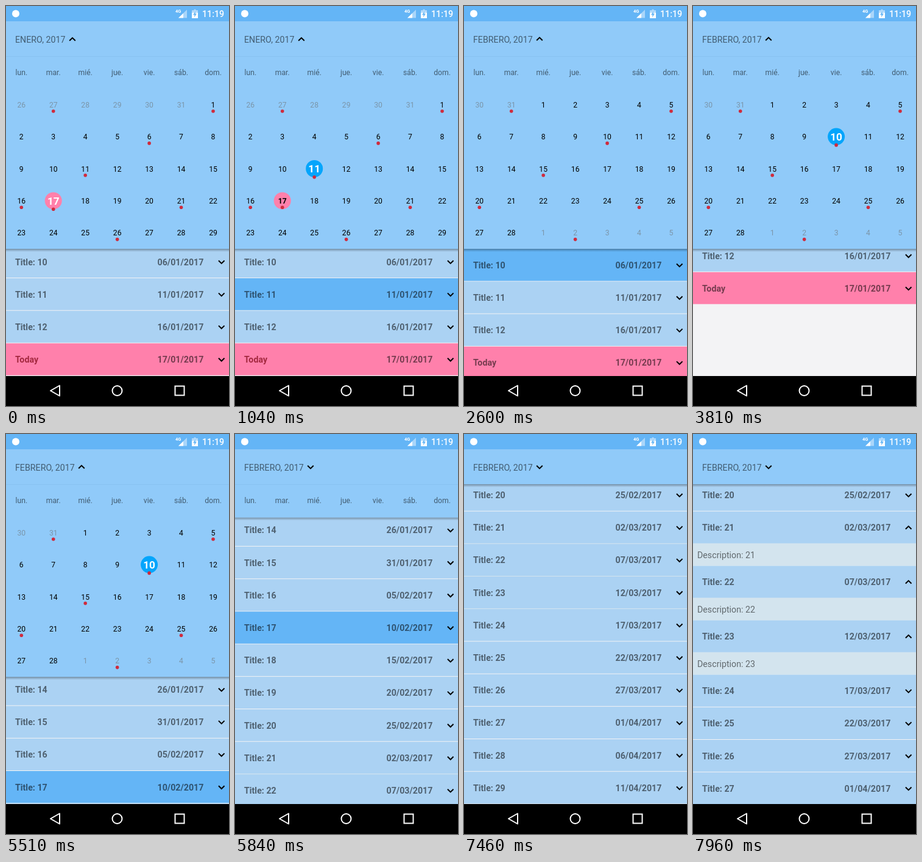
Animation of 366 by 654 pixels, one loop 8 s. Source, as an HTML page:

```html
<!DOCTYPE html>
<html lang="es">
<head>
<meta charset="utf-8">
<title>Calendario</title>
<style>
  html, body { margin: 0; width: 100%; height: 100%; overflow: hidden; background: #000; }
  svg { display: block; width: 100%; height: 100%; font-family: Roboto, sans-serif; }
</style>
</head>
<body>
<svg id="stage" viewBox="0 0 366 654">
  <defs>
    <linearGradient id="shade" x1="0" y1="0" x2="0" y2="1">
      <stop offset="0" stop-color="#000" stop-opacity=".32"/>
      <stop offset="1" stop-color="#000" stop-opacity="0"/>
    </linearGradient>
    <clipPath id="gridClip"><rect id="gridArea" x="0" y="82" width="366" height="315"/></clipPath>
  </defs>
  <rect width="366" height="654" fill="#f3f3f5"/>
  <g id="list"></g>
  <rect id="shadow" width="366" height="5" fill="url(#shade)"/>
  <rect id="panel" y="25" width="366" fill="#90caf9"/>
  <g clip-path="url(#gridClip)">
    <rect y="80.5" width="366" height="2" fill="#7fb8e6"/>
    <g id="days"></g>
    <g id="january"></g>
    <g id="february"></g>
  </g>
  <g id="header"></g>
  <g id="status">
    <rect width="366" height="25" fill="#64b5f6"/>
    <circle cx="16" cy="12.5" r="6" fill="#fff"/>
    <path d="M297 6V19.500H283Z" fill="#fff" opacity=".45"/>
    <path d="M291 12V19.500H283Z" fill="#fff"/>
    <path d="M308.500 5.500h3v1.500h3.500v13h-10v-13h3.500z" fill="#fff" opacity=".5"/>
    <path d="M305 11h10v9h-10z" fill="#fff"/>
    <path d="M311 8.500L307 14.500h2.500L309 18.500L313 12.500h-2.500z" fill="#64b5f6"/>
  </g>
  <g fill="none" stroke="#fff" stroke-width="2">
    <rect x="-5" y="605" width="376" height="60" fill="#000" stroke="none"/>
    <path d="M88 620.500V637.500L73 629Z" stroke-linejoin="round"/>
    <circle cx="182.500" cy="629" r="8"/>
    <rect x="277.500" y="621.500" width="15" height="15"/>
  </g>
</svg>
<script>
const LOOP = 8000, PITCH = 53.2, DESC = 35.8, BODY = 14.23, SMALL = 12.2;
const SOFT = 'rgba(0,0,0,.54)', BLUE = '#64b5f6', PINK = '#ff80ab';
const $ = id => document.getElementById(id);

function add(parent, tag, attrs, text) {
  const el = document.createElementNS('http://www.w3.org/2000/svg', tag);
  set(el, attrs);
  if (text !== undefined) el.textContent = text;
  return parent.appendChild(el);
}
function set(el, attrs) {
  for (const name in attrs) el.setAttribute(name, attrs[name]);
}
const label = (parent, text, x, y, size, attrs = {}) =>
  add(parent, 'text', { x, y: y + size * 0.355, 'font-size': size, fill: SOFT, ...attrs }, text);
const chevron = parent =>
  add(parent, 'path', { d: 'M-4.8 -2.3L0 2.4L4.8 -2.3', fill: 'none', stroke: '#000', 'stroke-width': 2 });
const place = (el, x, y, flip = 1) => el.setAttribute('transform', `translate(${x} ${y}) scale(1 ${flip})`);

const ease = {
  linear: u => u,
  out: u => 1 - (1 - u) ** 2,
  inOut: u => u * u * (3 - 2 * u)
};
// Each step: [time, value, easing towards it]
function track(t, steps) {
  let [t0, v0] = steps[0];
  for (const [t1, v1, kind = 'linear'] of steps) {
    if (t < t1) return t <= t0 ? v0 : v0 + (v1 - v0) * ease[kind]((t - t0) / (t1 - t0));
    [t0, v0] = [t1, v1];
  }
  return v0;
}
const ramp = (t, from, to, kind = 'inOut') => track(t, [[from, 0], [to, 1, kind]]);

const scrollSteps = [
  [0, 418.5], [1600, 418.5], [1830, 423.8, 'out'],
  [3690, 423.8], [3810, 303.4], [4060, 152, 'out'],
  [5510, 152], [5960, -163, 'inOut'],
  [6350, -163], [6430, -386.8], [6600, -485.2, 'out']
];
const panelSteps = [[5510, 397], [5960, 82, 'inOut']];

// Selection level of a key (day or row) from its on and off intervals
const selection = {
  today: t => 1 - ramp(t, 760, 960),
  11: t => ramp(t, 760, 1000) - ramp(t, 1540, 1760),
  10: t => ramp(t, 1540, 1800) - ramp(t, 3480, 3680),
  17: t => ramp(t, 3480, 3700)
};
const openings = {
  21: t => ramp(t, 7460, 7620),
  22: t => ramp(t, 7620, 7790),
  23: t => ramp(t, 7790, 7940)
};

function formatDate(title) {
  const date = new Date(Date.UTC(2017, 0, 6 + 5 * (title - 10)));
  return date.toISOString().slice(0, 10).split('-').reverse().join('/');
}

function makeRow(title) {
  const isToday = title === 'today';
  const g = add($('list'), 'g', {});
  const row = { title, g };
  if (openings[title]) {
    add(g, 'rect', { y: 25.6, width: 366, height: DESC + 1, fill: '#d3e4ee' });
    row.desc = label(g, 'Description: ' + title, 7, 45, BODY);
  }
  const box = { y: -26.6, width: 366, height: 52.2 };
  add(g, 'rect', { ...box, fill: isToday ? PINK : '#abd2f3' });
  if (!isToday && selection[title]) row.tint = add(g, 'rect', { ...box, fill: BLUE });
  const bold = { 'font-weight': 700 };
  row.name = label(g, isToday ? 'Today' : 'Title: ' + title, 15, 0, BODY, bold);
  label(g, isToday ? '17/01/2017' : formatDate(title), 248.5, 0, BODY, bold);
  row.arrow = chevron(g);
  place(row.arrow, 353.7, 0);
  return row;
}
const titles = Array.from({ length: 20 }, (_, i) => 10 + i);
titles.splice(3, 0, 'today');
const rows = titles.map(makeRow);

const columnX = i => 25.3 + 52.45 * i;
const middle = { 'text-anchor': 'middle' };
['lun.', 'mar.', 'mié.', 'jue.', 'vie.', 'sáb.', 'dom.'].forEach((name, i) =>
  label($('days'), name, columnX(i), 109, SMALL, middle));

// picked maps a cell index to its selection key
function makeMonth(id, firstDay, month, dotted, picked) {
  const cells = [];
  for (let i = 0; i < 35; i++) {
    const date = new Date(Date.UTC(2017, month, firstDay + i));
    const muted = date.getUTCMonth() !== month;
    const x = columnX(i % 7), y = 161.5 + 52.4 * Math.floor(i / 7);
    const key = picked[i], today = key === 'today';
    if (today) add($(id), 'circle', { cx: x, cy: y - 0.3, r: 14, fill: PINK });
    const disc = key && !today && add($(id), 'circle', { cx: x, cy: y - 0.3, fill: '#03a5fc' });
    const text = label($(id), date.getUTCDate(), x, y, SMALL, { ...middle, fill: muted ? '#7b95a9' : '#000' });
    const dot = dotted.includes(i) && add($(id), 'circle', { cx: x, cy: y + 10.5, r: 2.8, fill: '#cf2b3d' });
    if (key) cells.push({ key, today, y, disc, text, dot });
  }
  return cells;
}
const cells = [
  ...makeMonth('january', -5, 0, [1, 6, 11, 16, 21, 22, 26, 31], { 11: '10', 16: '11', 22: 'today' }),
  ...makeMonth('february', -1, 1, [1, 6, 11, 16, 21, 26, 31], { 11: '17' })
];

const monthName = label($('header'), '', 15, 54.5, BODY);
const monthArrow = chevron($('header'));
const white = { fill: '#fff' };
label($('status'), '4G', 278, 8.5, 7.5, { ...white, 'font-weight': 700 });
label($('status'), '11:19', 322, 13, BODY, { ...white, 'font-weight': 500 });

function drawList(t) {
  let y = track(t, scrollSteps);
  rows.forEach((row, k) => {
    place(row.g, 0, y);
    row.g.setAttribute('visibility', k > 3 && t < 3840 ? 'hidden' : 'visible');
    if (row.tint) row.tint.setAttribute('opacity', selection[row.title](t));
    if (row.title === 'today') row.name.setAttribute('fill', t < 1680 ? '#a3283f' : SOFT);
    y += PITCH;
    if (row.desc) {
      const open = openings[row.title](t);
      row.desc.setAttribute('opacity', open);
      place(row.arrow, 353.7, 0, open > 0.3 ? -1 : 1);
      y += DESC * open;
    }
  });
}

function drawCalendar(t) {
  const bottom = track(t, panelSteps);
  set($('panel'), { height: bottom - 25 });
  set($('gridArea'), { height: bottom - 82 });
  set($('shadow'), { y: bottom });

  const slide = 366 * ramp(t, 2190, 2580);
  place($('january'), -slide, 0);
  place($('february'), 366 - slide, 0);

  for (const { key, today, y, disc, text, dot } of cells) {
    const p = selection[key](t), size = SMALL + 5 * p;
    if (disc) set(disc, { r: 14 * p });
    set(text, {
      y: y + size * 0.355,
      'font-size': size,
      'font-weight': today || p > 0.5 ? 700 : 400,
      fill: p > 0.5 ? '#fff' : '#000'
    });
    set(dot, { cy: y + 10.5 + 3 * p });
  }

  const later = t >= 2400;
  monthName.textContent = later ? 'FEBRERO, 2017' : 'ENERO, 2017';
  place(monthArrow, later ? 124 : 109, later ? 54 : 54.5, t < 5560 ? -1 : 1);
}

function render(now) {
  const t = now % LOOP;
  drawList(t);
  drawCalendar(t);
}
function tick() {
  render(performance.now());
  requestAnimationFrame(tick);
}
tick();
</script>
</body>
</html>
```
